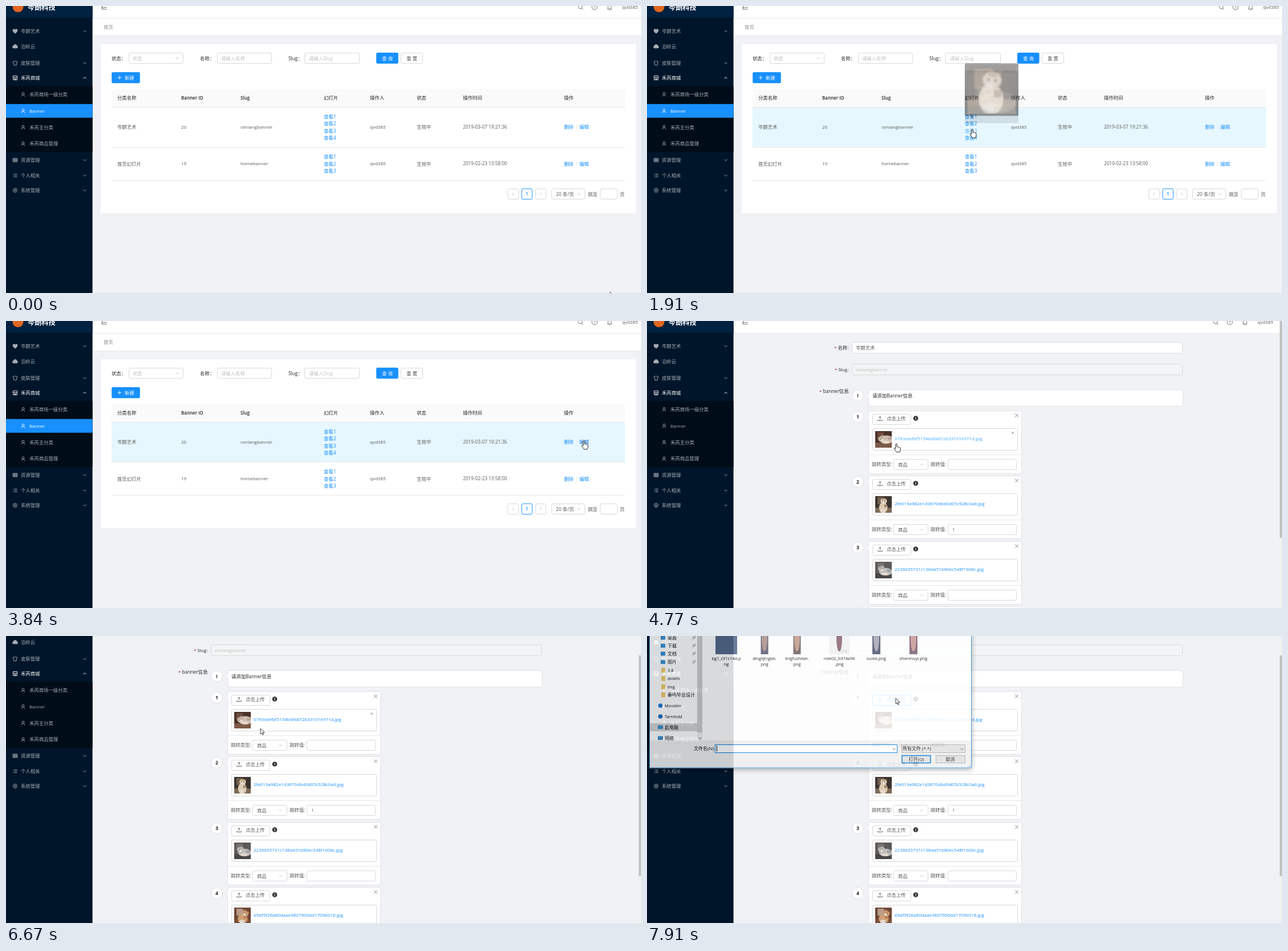
These frames come from a looping animation (1113x503 px, 7990 ms). An HTML page:

```html
<!DOCTYPE html>
<html lang="zh-CN">
<head>
<meta charset="utf-8">
<title>Banner</title>
<style>
  html, body { margin: 0; width: 100%; height: 100%; overflow: hidden; background: #f0f2f5; }
  svg { display: block; }
  text { font-family: "Open Sans", "Noto Sans CJK SC", "Noto Sans CJK", sans-serif; white-space: pre; }
  .soft { filter: blur(1.6px); }
  #panel { transform-origin: 286px 40px; filter: drop-shadow(0 2px 5px rgba(0, 0, 0, .4)); }
</style>
</head>
<body>
<script>
const LOOP = 7990;
const BLUE = '#1890ff', LIGHT = '#40a9ff', BODY = '#595959', HEAD = '#262626', HINT = '#bfbfbf';
const LINE = '#e8e8e8', EDGE = '#d9d9d9', MENU = '#a6adb4';
const SIDE = 151.6;

// Drawing helpers; text is placed by its left edge and vertical centre.
const hasHan = s => /[\u3000-\uffff]/.test(s);
const T = (x, y, s, fill = BODY, extra = '') => {
  const size = hasHan(s) ? 8.4 : 8;
  return `<text x="${x}" y="${y}" dy=".36em" ${extra} fill="${fill}" font-size="${size}">${s}</text>`;
};
const R = (x, y, w, h, fill, extra = '') =>
  `<rect x="${x}" y="${y}" width="${w}" height="${h}" fill="${fill}" ${extra}/>`;
const B = (x, y, w, h, fill = '#fff', stroke = EDGE, rx = 2.2) =>
  R(x + .5, y + .5, w - 1, h - 1, fill, `stroke="${stroke}" rx="${rx}"`);
const P = (x, y, d, stroke, fill = 'none', width = .9) =>
  `<path transform="translate(${x} ${y})" d="${d}" stroke="${stroke}" fill="${fill}" stroke-width="${width}"/>`;
const C = (x, y, r, fill, extra = '') => `<circle cx="${x}" cy="${y}" r="${r}" fill="${fill}" ${extra}/>`;
const E = (x, y, rx, ry, fill) => `<ellipse cx="${x}" cy="${y}" rx="${rx}" ry="${ry}" fill="${fill}"/>`;
const G = (attrs, ...kids) => `<g ${attrs}>${kids.flat().join('')}</g>`;
const MID = 'text-anchor="middle"';

const down = (x, y, c = HINT) => P(x, y, 'M-2.5-1.2L0 1.4 2.5-1.2', c);
const up = (x, y, c) => P(x, y, 'M-2.5 1.2L0-1.4 2.5 1.2', c);
const cross = (x, y, r, c) => P(x, y, `M${-r} ${-r}L${r} ${r}M${r} ${-r}L${-r} ${r}`, c);

// Timeline helper: stops are [ms, value].
let css = '', count = 0;
function anim(sel, prop, stops, ease = 'linear') {
  const name = 'k' + count++;
  const all = [...stops, [LOOP, stops[stops.length - 1][1]]];
  const rules = all.map(([t, v]) => `${(t / LOOP * 100).toFixed(3)}%{${prop}:${v}}`).join('');
  css += `@keyframes ${name}{${rules}}${sel}{animation:${name} ${LOOP}ms ${ease} infinite}\n`;
}
const flip = (sel, ...stops) => anim(sel, 'opacity', stops, 'step-end');

const icon = {
  heart: 'M0 4C-6 0-4-4-1.8-3.5Q-.5-3.3 0-2.2 .5-3.3 1.8-3.5C4-4 6 0 0 4z',
  cloud: 'M-2.6 2.8a1.9 1.9 0 0 1-.6-3.7a3.3 3.3 0 0 1 6.4 0A1.9 1.9 0 0 1 2.6 2.8z',
  shirt: 'M-1.5-3.5Q0-2 1.5-3.5L4-2.2 3 .2 2.3 0V3.7H-2.3V0L-3 .2-4-2.2z',
  shop: 'M-3.3-.3V3.5H3.3V-.3M-3.5-3.5H3.5L3.8-.5H-3.8zM-1 3.5V1.5H1V3.5',
  table: 'M-3.8-3H3.8V3H-3.8zM-3.8-1H3.8M-3.8 1H3.8M-1.3-3V3M1.3-3V3',
  list: 'M-3.5-2.5h1M-1.5-2.5h5M-3.5 0h1M-1.5 0h5M-3.5 2.5h1M-1.5 2.5h5',
  gear: 'M-1.3 0a1.3 1.3 0 1 0 2.6 0a1.3 1.3 0 1 0-2.6 0M-3.8 0L-1.9-3.3H1.9L3.8 0 1.9 3.3H-1.9z',
  user: 'M-2-1.4a2 2 0 1 0 4 0a2 2 0 1 0-4 0M-2.8 3.6C-2.6 1.6-1.2.7 0 .7S2.6 1.6 2.8 3.6',
  upload: 'M-3.8 1.5V3.5H3.8V1.5M0 1.5V-3.8M-2-1.8L0-3.8 2-1.8',
};

function sidebar() {
  const items = [
    ['heart', '岑朗艺术', 44], ['cloud', '泊岭云', 71], ['shirt', '皮肤管理', 100], ['shop', '禾芮商城', 126],
    ['table', '资源管理', 270], ['list', '个人相关', 297], ['gear', '系统管理', 323],
  ];
  const subs = ['禾芮商场一级分类', 'Banner', '禾芮主分类', '禾芮商品管理'];
  return [
    R(0, 0, SIDE, 20.6, '#002140'),
    C(21, 1.5, 9.5, '#e2661f'),
    T(38, 3, '岑朗科技', '#fff', 'font-size="12.2" font-weight="700"'),
    R(0, 140.4, SIDE, 115.4, '#000c17'),
    items.map(([key, label, y]) => {
      const open = key === 'shop', c = open ? '#fff' : MENU;
      const solid = key === 'heart' || key === 'cloud';
      const arrow = key === 'cloud' ? '' : open ? up(138, y, c) : down(138, y, c);
      return P(16, y, icon[key], c, solid ? c : 'none') + T(26, y, label, c) + arrow;
    }),
    subs.map((s, i) => P(30, 155 + i * 28.8, icon.user, MENU) + T(41, 155 + i * 28.8, s, MENU)),
    G('id="selected"', R(0, 171.8, SIDE, 24, BLUE), P(30, 184, icon.user, '#fff'), T(41, 184, 'Banner', '#fff')),
  ].flat().join('');
}

function topBar(dx) {
  const c = '#666';
  return [
    R(SIDE, 0, 962, 21, '#fff'), R(SIDE, 21, 962, 1, '#e6e8eb'),
    P(172, 2, 'M-5-2.6H5M-1 .5H5M-5 3.4H5M-2.5-1L-5 .5-2.5 2z', c),
    P(1007 + dx, 2, 'M-3.8-.6a3.4 3.4 0 1 0 6.8 0a3.4 3.4 0 1 0-6.8 0M2 1.8L4.4 4.6', c),
    C(1031.5 + dx, 2, 4.6, 'none', `stroke="${c}" stroke-width=".9"`),
    T(1031.5 + dx, 2, '?', c, MID + ' font-size="7"'),
    P(1058 + dx, 2, 'M-4 3.4H4M-2.9 3.4V-1Q-2.9-4 0-4T2.9-1V3.4M-.9 5H.9', c),
    T(1080 + dx, 2, 'qvd385', BODY),
  ].join('');
}

function listPage() {
  const cols = [195, 307, 411, 557, 638, 720, 801, 978];
  const heads = ['分类名称', 'Banner ID', 'Slug', '幻灯片', '操作人', '状态', '操作时间', '操作'];
  const row = (n, y, top, links, cells) => [
    cells.map((s, i) => s && T(cols[i], y, s, BODY, i === 6 ? 'font-size="8.2"' : '')),
    Array.from({ length: links }, (_, k) => T(557, top + k * 12.5, '查看' + (k + 1), BLUE, `id="r${n}l${k}"`)),
    T(978, y, '删除', BLUE), R(1000, y - 4, 1, 8, LINE), T(1005, y, '编辑', BLUE, `id="edit${n}"`),
  ].flat().join('');
  return G('id="list"',
    R(SIDE, 0, 962, 503, '#f0f2f5'), R(SIDE, 0, 962, 52, '#fff'), topBar(0), R(SIDE, 52, 962, 1, LINE),
    T(171, 37, '首页', '#8c8c8c'), R(166, 67, 938, 296, '#fff'),
    T(185, 91.5, '状态：', HEAD), B(215, 82, 96, 19), T(222, 91.5, '状态', HINT), down(300, 91.5),
    T(340, 91.5, '名称：', HEAD), B(370, 82, 96, 19), T(377, 91.5, '请输入名称', HINT),
    T(495, 91.5, 'Slug：', HEAD), B(523, 82, 97, 19), T(531, 91.5, '请输入Slug', HINT),
    R(649, 81.8, 38.6, 19.2, BLUE, 'rx="2.2"'), T(668.5, 91.5, '查 询', '#fff', MID),
    B(692, 82, 39, 19), T(711.5, 91.5, '重 置', BODY, MID),
    R(185.2, 116, 49.6, 19.2, BLUE, 'rx="2.2"'), P(199, 125.5, 'M-3.3 0H3.3M0-3.3V3.3', '#fff'), T(208, 125.5, '新建', '#fff'),
    R(185, 146, 900, 31, '#fafafa'),
    heads.map((s, i) => T(cols[i], 161, s, HEAD, hasHan(s) ? '' : 'font-weight="600"')),
    R(185, 177, 900, 70, '#e6f7ff', 'id="row1"'), R(185, 247, 900, 58, '#e6f7ff', 'id="row2"'),
    [177, 247, 305].map(y => R(185, y, 900, 1, LINE)),
    row(1, 212, 193.5, 4, ['岑朗艺术', '20', 'cenlangbanner', '', 'qvd385', '生效中', '2019-03-07 19:21:36']),
    row(2, 276.5, 264, 3, ['首页幻灯片', '19', 'homebanner', '', 'qvd385', '生效中', '2019-02-23 13:58:00']),
    B(879, 320, 20, 19), P(889, 329.5, 'M1.2-2.5L-1.4 0 1.2 2.5', HINT),
    B(903.4, 319.8, 19.4, 19.4, '#fff', BLUE), T(913, 329.5, '1', BLUE, MID + ' font-weight="600"'),
    B(928, 320, 19, 19), P(937.5, 329.5, 'M-1.2-2.5L1.4 0-1.2 2.5', HINT),
    B(956, 320, 59, 19), T(964, 329.5, '20 条/页'), down(1004, 329.5),
    T(1020, 329.5, '跳至'), B(1041, 320, 31, 19), T(1076, 329.5, '页'),
    [0, 1, 2, 3].map(popup));
}

const cats = [
  { wall: '#4a332b', lit: '#6d4a3d', floor: '#7d5a47', fur: '#cdbcaf', mark: '#94806f', body: [58, 44, 36, 22], head: [33, 40], tilt: -30 },
  { wall: '#3b3431', lit: '#75614f', floor: '#7d6a58', fur: '#dccbb3', mark: '#7d5a3a', body: [42, 60, 22, 28], head: [44, 26], tilt: 8 },
  { wall: '#5e5a58', lit: '#77716e', floor: '#4a4644', fur: '#bdbdbd', mark: '#7d7d80', body: [54, 52, 34, 20], head: [32, 36], tilt: -20 },
  { wall: '#6e4535', lit: '#b79c8a', floor: '#7c4f3a', fur: '#cf9f76', mark: '#a5683a', body: [44, 58, 26, 25], head: [58, 30], tilt: 35 },
];
function photo(i, x, y, size) {
  const { wall, lit, floor, fur, mark, body, head, tilt } = cats[i];
  const [bx, by, rx, ry] = body;
  return `<svg x="${x}" y="${y}" width="${size}" height="${size}" viewBox="0 0 86 86">` + R(0, 0, 86, 86, wall) + G('class="soft"',
    R(12, 6, 34, 36, lit), R(-4, 60, 94, 30, floor),
    E(bx, by, rx, ry, fur), E(bx - 4, by + ry * .55, rx * .55, ry * .35, '#e6d9cc'),
    [0, 1, 2].map(k => P(bx + rx * (.3 + k * .2), by - ry * .55, 'M0 0q3 6 0 12', mark, 'none', 3)),
    G(`transform="translate(${head}) rotate(${tilt})"`,
      P(0, 0, 'M-15-5L-14-20-5-13zM15-5L14-20 5-13z', 'none', mark),
      E(0, 0, 17, 15, fur), P(0, -9, 'M-5-4V3M0-5V3M5-4V3', mark, 'none', 2),
      E(0, 7, 8, 6, '#e9dccf'), C(-6, 0, 2, '#4a3a30'), C(6, 0, 2, '#4a3a30'))) + '</svg>';
}
function popup(k) {
  const y = 88 + k * 12.6;
  return G(`id="pop${k}"`,
    R(557, y, 94, 92, 'rgba(0,0,0,.75)', 'rx="2.4"'),
    P(570, y + 92, 'M-3.2 0H3.2L0 3.4z', 'none', 'rgba(0,0,0,.75)'), photo(k, 561.8, y + 3.8, 84.4));
}

function badge(y, s) {
  return C(369.5, y, 9.8, '#fff', 'stroke="#dcdee2" stroke-width="1"') +
    T(369.5, y, s, '#222', MID + ' font-size="8.6" font-weight="700"');
}
const tail = y => P(388.5, y, 'M0-3.5L-3.5 0 0 3.5', LINE, '#fff');

function uploadButton(y, c, edge) {
  return B(395, y, 68, 19, '#fff', edge) + P(408.5, y + 8, icon.upload, c) + T(420, y + 8, '点击上传', c);
}
function card(name, i) {
  const y = 157 + Math.round(i * 114.3);
  return [
    badge(y + 11, i + 1), B(388, y, 269, 111, '#fff', '#dfe1e4', 1.5), tail(y + 11),
    uploadButton(y + 6, BODY, EDGE), G(`id="hot${i}" opacity="0"`, uploadButton(y + 6, BLUE, BLUE)),
    C(471, y + 13.5, 4.3, '#333'), T(471, y + 13.5, 'i', '#fff', MID + ' font-size="6.5" font-weight="700"'),
    cross(648, y + 8.5, 3, '#777'),
    B(395, y + 31, 255, 39), photo(i, 400, y + 36, 29), T(434, y + 49.5, name + '.jpg', BLUE, `id="file${i}"`),
    G(`id="drop${i}" opacity="0"`, cross(641, y + 39, 1.8, '#888')),
    R(389, y + 77, 267, 1, LINE),
    T(394, y + 94, '跳转类型:'), B(432, y + 85, 61, 19), T(440, y + 94.5, '商品'), down(481.5, y + 94.5),
    T(497, y + 94, '跳转值:'), B(527, y + 85, 121, 19), i === 1 ? T(535, y + 94.5, '1') : '',
  ].join('');
}
function editPage() {
  const label = (x, y, s) => T(x, y, '*', '#b3202a') + T(x + 6.4, y, s, HEAD) + T(352, y, ':', HEAD);
  const names = ['07fcbdefbf5154bdfa872b33101e971d', '2fe019a982e1d3670dbd0d05c928c0a6',
    '2236635731c138da51b80ec548f1606c', 'e9df5f26a80daae3807906dd17096018'];
  return G('id="form"', R(SIDE, 0, 962, 503, '#f0f2f5'),
    G('class="scroll"', topBar(-10),
      label(328, 47, '名称'), B(359, 37, 580, 20), T(366, 47, '岑朗艺术'),
      label(329, 85, 'Slug'), B(359, 75, 580, 20, '#f3f4f5'), T(366, 85, 'cenlangbanner', HINT),
      label(302, 123, 'banner信息'), badge(130.5, '!'), B(388, 120, 552, 30, '#fff', '#dfe1e4', 1.5), tail(131),
      T(395, 131, '请添加Banner信息', HEAD, 'font-weight="500"'),
      names.map(card)),
    R(1109, 0, 4, 503, '#f1f1f1'), G('id="thumb"', R(1109, -7, 4, 387, '#c1c1c1')));
}

function dialog() {
  const K = '#111', SMALL = 'font-size="7.4"';
  const D = (x, y, s, extra = '') => T(x, y, s, K, (hasHan(s) ? 'font-size="8" ' : SMALL + ' ') + extra);
  const quick = [['桌面', 3], ['下载', 17], ['文档', 31], ['图片', 45.5]];
  const folders = [['3.8', 60], ['assets', 74.5], ['img', 89], ['秦屿毕业设计', 103]];
  const places = [['Mossbin', 122, '#1f7fe0'], ['Tarnhold', 141, '#1670c4'], ['此电脑', 160, '#3b8fc9'], ['网络', 179, '#3b8fc9']];
  // Centre, width, backdrop, figure, two lines of the name
  const files = [
    [139, 38, '#56698a', '#56698a', 'bg1_c91c14d.p', 'ng'], [206, 13, '#5c5a72', '#a98f86', 'dinglijingtai.', 'png'],
    [263, 13, '#6d5f62', '#c09a88', 'lingfuzhilan.', 'png'], [337, 36, '#f4f2f3', '#8a6470', 'role02_b374a96', '.png'],
    [402, 14, '#4f5570', '#a8a3b0', 'luoke.png', ''], [467, 14, '#7a5f72', '#c99a94', 'shenmuyi.png', ''],
  ];
  return G('id="dialog"', G('id="panel"',
    R(4, -150, 565, 381.5, '#fff'), R(4, 183, 565, 48, '#f0f0f0'),
    R(5, 153, 83, 14, '#d4d4d4'), R(88, -100, 9, 283, '#f0f0f0'), R(88, -60, 9, 229, '#cdcdcd'), down(92.5, 179, '#444'),
    quick.map(([s, y]) => R(24, y - 3.5, 8, 7, '#3a8fd0', 'rx="1"') + D(36, y, s) +
      P(82, y, 'M-2.6 2.8L-.5.7M-1.8-.8L1 2M-.6-1L1.2-2.8 2.9-1 1 .8', '#666')),
    folders.map(([s, y]) => R(25, y - 4.5, 7, 9, '#f2cd6b', 'rx=".8"') + D(36, y, s)),
    places.map(([s, y, c]) => (y < 150 ? C(23.5, y, 3.8, c) : R(19, y - 3.5, 9, 6.5, c, 'rx="1"')) + D(31, y, s)),
    files.map(([x, w, back, figure, a, b]) => R(x - w / 2, -20, w, 52, back) + E(x, 5, 5, 22, figure) +
      D(x, 39, a, MID) + D(x, 49.5, b, MID)),
    D(82, 197.5, '文件名(N):'), B(119, 190, 320, 15, '#fff', '#0078d7', 0), R(122, 192.5, 1, 10, '#000'), down(433, 198, '#555'),
    B(446, 190, 112, 15, '#e1e1e1', '#adadad', 0), D(448, 197.5, '所有文件 (*.*)'), down(552, 198, '#555'),
    R(447, 209.5, 50, 13, '#e1e1e1', 'stroke="#0078d7" stroke-width="1.6"'), D(472, 216, '打开(O)', MID),
    B(506, 209, 52, 14, '#e1e1e1', '#adadad', 0), D(531.5, 216, '取消', MID),
    P(565, 228, 'M-2 2L2-2M0 2L2 0', '#999', 'none', .7),
    R(4.5, -150, 564, 381, 'none', 'stroke="#2f8fdc"')));
}

const cursor = G('id="cursor"',
  G('id="arrow"', P(0, 0, 'M0 0V10L2.3 7.9 3.9 11.4 5.4 10.7 3.9 7.4H7z', '#111', '#fff', .8)),
  G('id="hand"', P(0, 0, 'M-1.2.8Q0-.9 1.2.8V5.6Q2.6 5 3.3 6 4.6 5.5 5.2 6.6 6.7 6.2 7 7.8V11Q6.7 13 5.8 14.8H.2Q-1 12.6-3.6 9.4-4.2 7.6-2.7 7.6L-1.2 9z', '#111', '#fff', .9)));

// Pointer route: [ms, x, y]
const route = [
  [0, 1059, 501], [70, 1055, 498], [400, 760, 320], [650, 605, 222], [820, 570, 192], [1070, 570, 192],
  [1220, 570, 195], [1600, 570, 210], [1760, 570, 211], [2060, 570, 221], [2220, 570, 223], [2350, 570, 230],
  [2550, 575, 232], [2760, 880, 231], [2990, 1016, 222], [3070, 1030, 220], [3380, 1013, 210], [3990, 1013, 210],
  [4150, 985, 212], [4500, 560, 226], [4770, 437, 215], [4940, 437, 215], [5200, 432, 222], [5580, 404, 235],
  [5800, 403, 235], [6000, 384, 237], [6180, 388, 205], [6400, 428, 166], [6590, 445, 164], [6670, 446, 162],
  [7050, 440, 124], [7300, 436, 111], [7440, 436, 109],
];
anim('#cursor', 'transform', route.map(([t, x, y]) => [t, `translate(${x}px,${y}px)`]));
const hands = [[0, 0], [760, 1], [2560, 0], [3220, 1], [3990, 0], [4690, 1], [5020, 0], [5520, 1], [5900, 0], [7060, 1], [7520, 0]];
flip('#hand', ...hands);
flip('#arrow', ...hands.map(([t, v]) => [t, 1 - v]));

flip('#list', [0, 1], [3990, 0]);
flip('#form', [0, 0], [3990, 1]);
flip('#selected', [0, 1], [3990, 0]);
flip('#row2', [0, 0], [430, 1], [600, 0]);
flip('#row1', [0, 0], [600, 1]);

[[880, 1380], [1420, 1860], [1900, 2360], [2420, 2840]].forEach(([from, to], k) => {
  anim('#pop' + k, 'opacity', [[0, 0], [from, 0], [from + 80, 1], [to, 1], [to + 100, 0]]);
  anim('#r1l' + k, 'fill', [[0, BLUE], [from - 60, BLUE], [from, '#55b3ff'], [to - 250, '#55b3ff'], [to - 100, BLUE]]);
});
anim('#edit1', 'fill', [[0, BLUE], [3250, BLUE], [3530, LIGHT], [3760, LIGHT], [3840, '#096dd9']]);

anim('.scroll', 'transform', [[0, 'translateY(0)'], [4940, 'translateY(0)'], [5100, 'translateY(-60px)']]);
anim('#thumb', 'transform', [[0, 'translateY(0)'], [4940, 'translateY(0)'], [5100, 'translateY(41px)']]);
anim('#file0', 'fill', [[0, BLUE], [4600, BLUE], [4770, LIGHT], [4940, LIGHT], [5100, BLUE]]);
flip('#drop0', [0, 0], [4600, 1], [5020, 0], [6400, 1], [6990, 0]);
anim('#hot1', 'opacity', [[0, 0], [5520, 0], [5650, .5], [5800, 1], [5900, 1], [6150, 0]]);
anim('#hot0', 'opacity', [[0, 0], [7060, 0], [7350, 1]]);
anim('#dialog', 'opacity', [[0, 0], [7720, 0], [7910, .85]]);
anim('#panel', 'transform', [[0, 'scale(.92)'], [7720, 'scale(.92)'], [7910, 'scale(1)']]);

const style = document.createElement('style');
style.textContent = css;
document.head.append(style);
document.body.innerHTML = '<svg width="1113" height="503" viewBox="0 0 1113 503">' +
  editPage() + listPage() + R(0, 0, SIDE, 503, '#001529') + G('class="scroll"', sidebar()) + dialog() + cursor + '</svg>';
</script>
</body>
</html>
```
